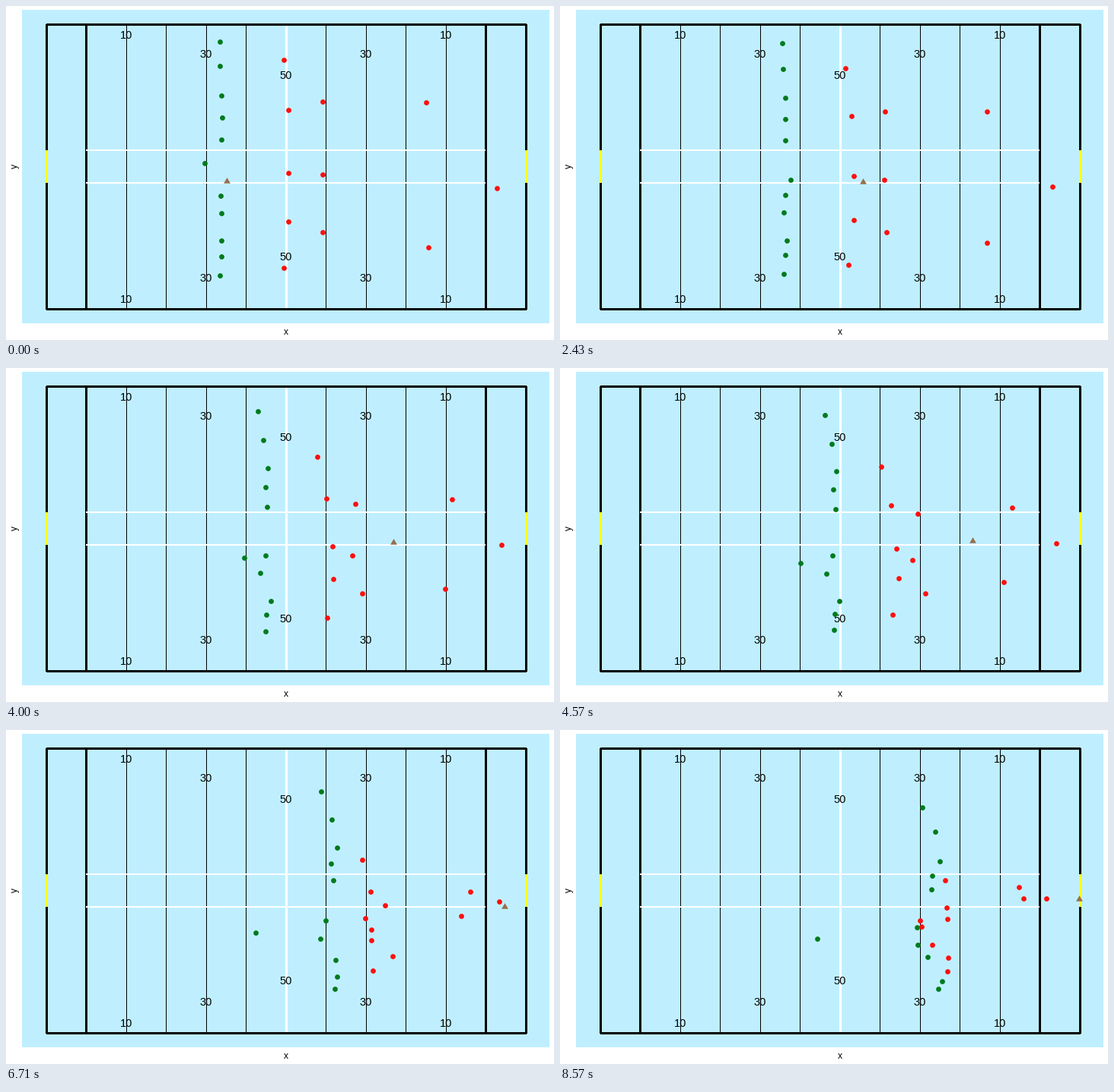
Animation of 720x440 px, one loop 8710 ms. Source, as a matplotlib script:

```python
import numpy as np
import matplotlib.pyplot as plt
from matplotlib.animation import FuncAnimation
from matplotlib.patches import Circle, Polygon, Rectangle

W, H, DPI = 720, 440, 100
POSES, TICKS, TICK_MS = 61, 335, 26  # the pose steps 61 times per loop
SKY, RED, GREEN, BROWN = "#bfefff", "#ff0f0f", "#007a1e", "#966f4c"

# Players stand until the kick, then speed up over RAMP poses.
KICK, RAMP, MID, LAST = 8, 14, 40, POSES - 1

# Each run: where it starts, passes at MID and ends.
KICK_RUNS = [
    [(281, 47), (382, 71), (476, 102)],
    [(281, 79), (394, 110), (493, 134)],
    [(283, 118), (401, 146), (499, 173)],
    [(284, 147), (395, 168), (489, 192)],
    [(283, 176), (398, 192), (488, 210)],
    [(282, 250), (392, 248), (469, 260)],
    [(283, 273), (383, 272), (470, 283)],
    [(283, 309), (403, 305), (483, 299)],
    [(283, 330), (400, 324), (502, 331)],
    [(281, 355), (398, 342), (497, 341)],
]
RETURN_RUNS = [
    [(365, 71), (447, 153), (506, 198)],
    [(371, 137), (460, 199), (508, 234)],
    [(416, 126), (487, 215), (509, 249)],
    [(552, 127), (605, 202), (609, 222)],
    [(371, 220), (462, 244), (473, 251)],
    [(416, 222), (475, 260), (475, 259)],
    [(645, 240), (651, 228), (639, 222)],
    [(371, 284), (467, 276), (489, 283)],
    [(416, 298), (498, 297), (510, 300)],
    [(555, 318), (592, 263), (603, 207)],
    [(365, 345), (463, 320), (509, 318)],
]
# Waypoints as (pose, x, y)
KICKER = [(0, 261, 207), (17, 303, 229), (32, 316, 257), (60, 338, 275)]
BALL = [(9, 290, 230), (17, 398, 231), (23, 467, 232), (32, 542, 227),
        (47, 655, 232), (55, 680, 226), (60, 682, 222)]


def effort(t):
    """Distance run at unit top speed, after a steady acceleration."""
    s = max(t - KICK, 0)
    return s * s / (2 * RAMP) if s < RAMP else s - RAMP / 2


def run(points, t):
    """Quadratic path through start, middle and end."""
    start, mid, end = np.array(points, float)
    u, m, e = effort(t), effort(MID), effort(LAST)
    to_mid, to_end = (mid - start) / m, (end - start) / e
    bend = (to_end - to_mid) / (e - m)
    return start + u * (to_mid + bend * (u - m))


def follow(points, t):
    times, xs, ys = zip(*points)
    return np.array([np.interp(t, times, xs), np.interp(t, times, ys)])


fig = plt.figure(figsize=(W / DPI, H / DPI), dpi=DPI, facecolor="white")
ax = fig.add_axes([0, 0, 1, 1])
ax.set_xlim(-0.5, W - 0.5)
ax.set_ylim(H - 0.5, -0.5)
ax.axis("off")


def box(x0, y0, x1, y1, color, z):
    """Fill whole pixels, both ends included."""
    ax.add_patch(Rectangle((x0 - 0.5, y0 - 0.5), x1 - x0 + 1, y1 - y0 + 1,
                           facecolor=color, linewidth=0, antialiased=False, zorder=z))


def label(x, y, text, px, **kw):
    ax.text(x - 0.5, y, text, fontsize=px * 72 / DPI, family="Liberation Sans",
            color="black", ha="center", va="baseline", zorder=5, **kw)


# Field
box(21, 5, 713, 417, SKY, 0)
for k in range(1, 10):
    x = int(105.5 + 52.5 * k)
    box(x, 24, x, 399, "black", 1)
box(367, 24, 369, 399, "white", 2)
for x in (53, 105, 630, 683):
    box(x - 1, 24, x + 1, 399, "black", 3)
for y in (24, 399):
    box(53, y - 1, 683, y + 1, "black", 3)
for y in (189, 232):
    box(105, y, 629, y + 1, "white", 4)
for x in (53, 683):
    box(x - 1, 190, x + 1, 232, "yellow", 4)

for text, columns, rows in (("10", (158, 578), (38, 386)),
                            ("30", (263, 473), (63, 358)),
                            ("50", (368,), (91, 330))):
    for x in columns:
        for y in rows:
            label(x, y + 4, text, 14.6)
label(368, 432.5, "x", 12)
label(14.5, 210, "y", 12, rotation=90, rotation_mode="anchor")


# Players and ball
def dot(color):
    return ax.add_patch(Circle((0, 0), 3.4, facecolor=color, linewidth=0, zorder=6))


movers = [(dot(GREEN), run, points) for points in KICK_RUNS]
movers += [(dot(RED), run, points) for points in RETURN_RUNS]
movers.append((dot(GREEN), follow, KICKER))
TRIANGLE = np.array([(0, -4.4), (4.4, 3.2), (-4.4, 3.2)])
ball = ax.add_patch(Polygon(TRIANGLE, facecolor=BROWN, linewidth=0, zorder=7))


def update(n):
    pose = int((n + 0.9) * POSES / TICKS)
    for mark, path, points in movers:
        mark.set_center(np.rint(path(points, pose)))
    ball.set_xy(TRIANGLE + np.rint(follow(BALL, pose)))
    return [mark for mark, _, _ in movers] + [ball]


anim = FuncAnimation(fig, update, frames=TICKS, interval=TICK_MS,
                     repeat=True, repeat_delay=0, blit=False)
plt.show()
```
